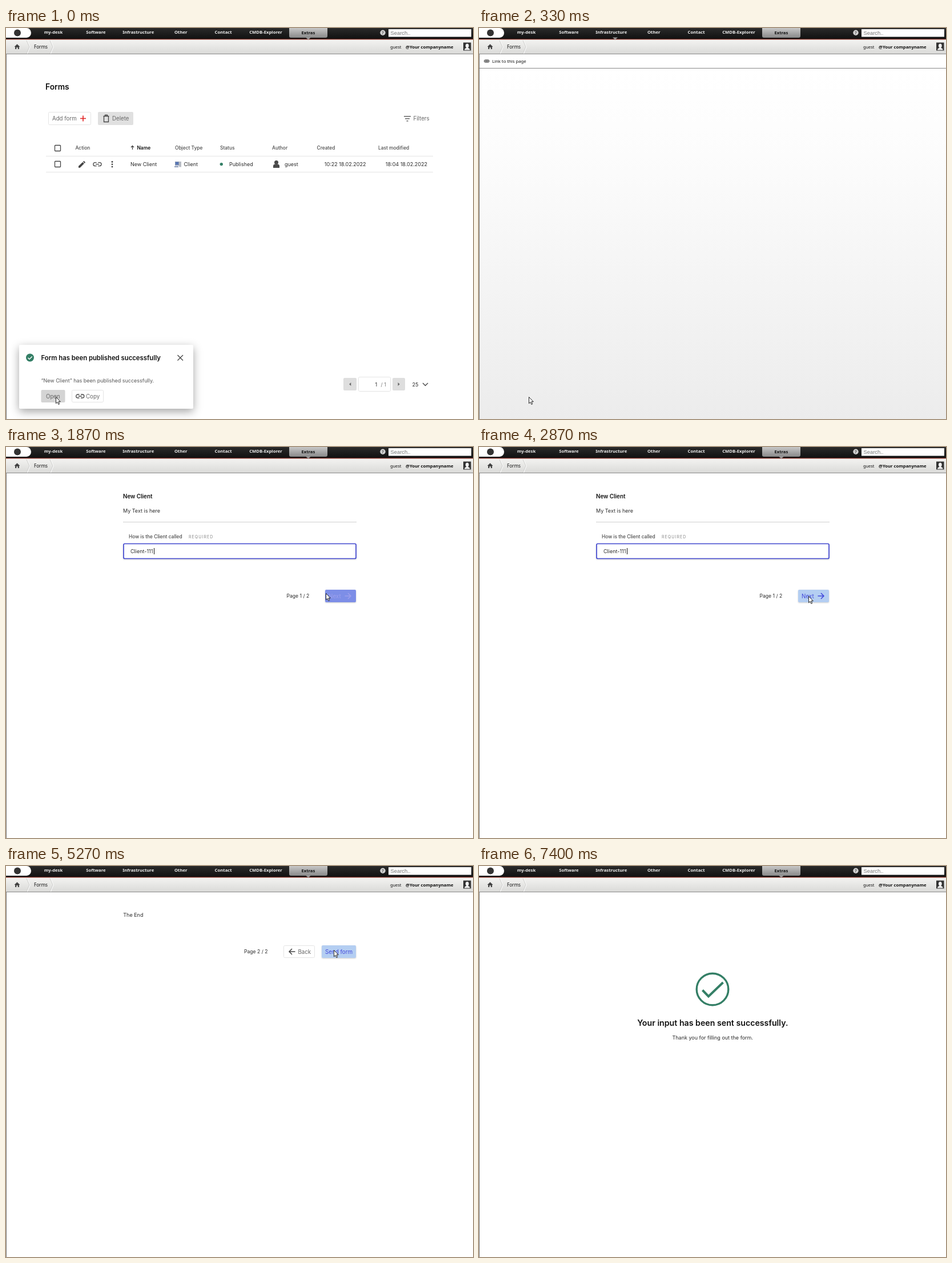
These frames come from a looping animation (818x685 px, 8.14 s). An HTML page:

```html
<!DOCTYPE html>
<html lang="en">
<head>
<meta charset="utf-8">
<title>Filling out a form</title>
<style>
  html, body { margin: 0; width: 100%; height: 100%; overflow: hidden; background: #fff; }
  svg { display: block; width: 818px; height: 685px; font: 9px Inter, sans-serif; fill: #2b2b2b; }
  .ui { font: 7.7px "Noto Sans", sans-serif; fill: #111; }
  .menu { font-weight: 700; fill: #eee; text-anchor: middle; }
  .head { font-size: 8.4px; font-weight: 500; fill: #4a4a4a; }
  .btn { font-size: 9.7px; fill: #666; }
  .bold { font-weight: 600; fill: #111; }
  .mid { text-anchor: middle; }
  .line { fill: none; stroke: #444; stroke-width: 1.3; }
  .frame { fill: #fff; stroke: #e4e4e4; }
  .primary { filter: drop-shadow(0 1px 1px rgba(0, 0, 0, .2)); }
  .toast { fill: #fff; filter: drop-shadow(0 5px 8px rgba(0, 0, 0, .36)); }
</style>
</head>
<body>
<svg viewBox="0 0 818 685">
  <defs>
    <linearGradient id="bar" x2="0" y2="1"><stop stop-color="#2a2a2a"/><stop offset="1" stop-color="#111"/></linearGradient>
    <linearGradient id="crumbs" x2="0" y2="1"><stop stop-color="#f3f3f1"/><stop offset="1" stop-color="#dadad8"/></linearGradient>
    <linearGradient id="tab" x2="0" y2="1"><stop stop-color="#d2d2d2"/><stop offset="1" stop-color="#898989"/></linearGradient>
    <linearGradient id="blank" x2="0" y2="1"><stop stop-color="#fff"/><stop offset=".25" stop-color="#fcfcfc"/><stop offset="1" stop-color="#ececec"/></linearGradient>
    <path id="chain" class="line" d="M6 -3H3.2a3 3 0 0 0 0 6H6M8.5 -3h2.8a3 3 0 0 1 0 6H8.5M4.3 0h6"/>
    <path id="arrow" d="M0 0h10.5M5.5 -5l5 5l-5 5" fill="none" stroke-width="1.5"/>
    <rect id="box" class="line" width="10" height="10" rx="1"/>
  </defs>

  <g id="page">
    <g id="list">
      <text class="bold" x="69" y="107.5" font-size="13.8">Forms</text>
      <rect class="frame" x="74.500" y="147.500" width="74" height="22" rx="2"/>
      <text class="btn" x="81" y="162.300">Add form</text>
      <path d="M130 158.500h10M135 153.500v10" stroke="#e02020" stroke-width="1.6"/>
      <rect x="161" y="147" width="62" height="23" rx="2" fill="#e0e0e0"/>
      <path d="M170.500 154.500h10M173.500 154v-1.500h4v1.500M171.500 154.500v10h8v-10" class="line" stroke="#777"/>
      <text class="btn" x="186" y="162.300" fill="#888">Delete</text>
      <path class="line" d="M697 154.800h12M699 158.800h8M701.500 162.800h3"/>
      <text class="btn" x="713.500" y="162.300">Filters</text>

      <use href="#box" x="85.500" y="205.500"/>
      <g class="head">
        <text x="121.500" y="213">Action</text>
        <path class="line" stroke-width="1" d="M221.500 213v-6.500M219 209l2.500-2.500l2.500 2.500"/>
        <text class="bold" x="229.500" y="213">Name</text>
        <text x="296" y="213">Object Type</text>
        <text x="375" y="213">Status</text>
        <text x="466" y="213">Author</text>
        <text x="544.500" y="213">Created</text>
        <text x="652" y="213">Last modified</text>
      </g>
      <path d="M70 224.500h678M70 252.500h678" stroke="#e4e4e4"/>

      <use href="#box" x="85.500" y="233.500"/>
      <path d="M127 244.800v-2.700l7.200-7.200 2.700 2.700-7.200 7.200zM135 234.200l1.400-1.400 2.700 2.700-1.400 1.400z" fill="#444"/>
      <use href="#chain" x="152.700" y="238.700"/>
      <g fill="#444"><circle cx="186" cy="234.500" r="1.400"/><circle cx="186" cy="238.800" r="1.400"/><circle cx="186" cy="243.100" r="1.400"/></g>
      <text x="218" y="242">New Client</text>
      <path d="M296 234h7v7h-7zM295 242h7v2h-7z" fill="#8796b4"/>
      <path d="M303 234h4v9.500h-4z" fill="#b8bcc4"/><path d="M297 235h5v4h-5z" fill="#5675b5"/>
      <text x="311.500" y="242">Client</text>
      <circle cx="377.300" cy="238.600" r="2.700" fill="#347f66"/>
      <text x="391" y="242">Published</text>
      <circle cx="473.500" cy="235.500" r="3.500" fill="#4a4a4a"/>
      <path d="M468 245v-3q0-3.500 3.500-3.500h4q3.500 0 3.500 3.500v3z" fill="#4a4a4a"/>
      <text x="488" y="242">guest</text>
      <text x="630.500" y="242" text-anchor="end">10:22 18.02.2022</text>
      <text x="738" y="242" text-anchor="end">18:04 18.02.2022</text>

      <path d="M591 615q0-2 2-2h19q2 0 2 2v18q0 2-2 2h-19q-2 0-2-2zM677 615q0-2 2-2h18q2 0 2 2v18q0 2-2 2h-18q-2 0-2-2z" fill="#dedede"/>
      <path d="M604.300 621v6l-3.200-3zM686.500 621v6l3.200-3z" fill="#666"/>
      <rect class="frame" x="617.500" y="611.500" width="56" height="25" rx="2"/>
      <text x="646.500" y="627.500">1<tspan fill="#777" x="656.500">/ 1</tspan></text>
      <text x="711.500" y="627.500">25</text>
      <path class="line" d="M730 622l4.500 4.500l4.500-4.500"/>

      <rect class="toast" x="23" y="555" width="305" height="112" rx="2"/>
      <circle cx="42" cy="577.500" r="7" fill="#347f66"/>
      <path d="M38.500 577.700l2.500 2.500l4.700-4.800" fill="none" stroke="#fff" stroke-width="1.500"/>
      <text class="bold" x="61.500" y="581.700" font-size="11.300">Form has been published successfully</text>
      <path class="line" d="M300.500 573l9.500 9.500M310 573l-9.500 9.500"/>
      <text x="61.500" y="620.500" fill="#555">“New Client” has been published successfully.</text>
      <rect x="61.500" y="634" width="42" height="22" rx="2" fill="#d4d4d4"/>
      <text class="btn" x="70" y="648.800">Open</text>
      <rect class="frame" x="115.500" y="634.500" width="55" height="21" rx="2"/>
      <use href="#chain" x="122.500" y="645"/>
      <text class="btn" x="140" y="648.800">Copy</text>
    </g>

    <g id="loading">
      <rect y="71" width="818" height="614" fill="url(#blank)"/>
      <path d="M0 70.500h818" stroke="#888"/>
      <rect x="9" y="55.800" width="9" height="4.400" rx="2.200" fill="#aaa" stroke="#555"/>
      <path d="M11 58h5" stroke="#444"/>
      <text class="ui" x="23" y="60.500" font-size="7.500">Link to this page</text>
    </g>

    <g id="form">
      <text class="bold" x="205" y="90" font-size="9.800">New Client</text>
      <text x="205" y="115">My Text is here</text>
      <path d="M205 131.500h409" stroke="#cfcfcf"/>
      <text class="head" x="215" y="160">How is the Client called</text>
      <text x="320" y="160" font-size="7" letter-spacing="1.050" fill="#888">REQUIRED</text>
      <rect class="primary" x="206" y="169.500" width="407" height="26" rx="2" fill="#fff" stroke="#4147d0" stroke-width="1.700"/>
      <text x="218" y="186">Client-111</text>
      <path id="caret" d="M259.500 177v11" stroke="#111"/>
      <text x="491.500" y="264" font-size="8.600">Page 1 / 2</text>
      <rect id="nextBox" class="primary" x="559" y="250" width="54" height="22" rx="2"/>
      <g id="nextLabel"><text x="565" y="264.800" font-size="9.800" fill="inherit">Next</text><use href="#arrow" x="593.500" y="261"/></g>
    </g>

    <g id="end">
      <text x="205.300" y="89">The End</text>
      <text x="417" y="153" font-size="8.600">Page 2 / 2</text>
      <rect class="frame" x="486.500" y="139.500" width="54" height="21" rx="2"/>
      <use href="#arrow" transform="translate(506.500 150) scale(-1 1)" stroke="#444"/>
      <text class="btn" x="511.500" y="153.700">Back</text>
      <rect id="sendBox" class="primary" x="553" y="139" width="60" height="22" rx="2"/>
      <text id="sendLabel" class="mid" x="583" y="153.700" font-size="9.800">Send form</text>
    </g>

    <g id="success">
      <g fill="none" stroke="#347f66"><circle cx="409" cy="216" r="27.800" stroke-width="3.400"/><path d="M391.500 217.500l10.500 11l25.500-24.500" stroke-width="4"/></g>
      <text class="bold mid" x="409.300" y="280" font-size="14.200">Your input has been sent successfully.</text>
      <text class="mid" x="409.300" y="304">Thank you for filling out the form.</text>
    </g>

    <path d="M.5 45v640" stroke="#777"/>
    <rect width="818" height="19" fill="url(#bar)"/>
    <path d="M0 19.500h818" stroke="#7d3028"/>
    <path d="M0 20.500h818" stroke="#c9aaa4"/>
    <rect y="21" width="818" height="24" fill="url(#crumbs)"/>
    <path d="M0 45.500h818" stroke="#888"/>
    <path d="M0 0h36a8 8.500 0 0 1 0 17H0z" fill="#fff"/>
    <circle cx="20" cy="8.500" r="6" fill="#333"/>
    <rect x="496" y="-3" width="67" height="20" rx="3" fill="url(#tab)"/>
    <path id="pointer" d="M-4.500 16.500h9l-4.500 4z" fill="#999"/>
    <g class="ui menu" id="menu"></g>
    <circle cx="660" cy="8.200" r="4.700" fill="#d0d0d0"/>
    <text class="ui mid" x="660" y="11" font-weight="700">?</text>
    <rect x="670" y="2" width="145" height="13.500" fill="#fff"/>
    <text x="673.500" y="12" style="font:9.400px 'Liberation Sans',sans-serif" fill="#757575">Search..</text>
    <path d="M14.500 33l5-4.800l5 4.800h-1.500v4h-2.300v-3h-2.400v3h-2.300v-4z" fill="#444"/>
    <path d="M37 22l5 11l-5 12M78 22l5 11l-5 12" fill="none" stroke="#fafafa" stroke-width="1.500"/>
    <path d="M36 22l5 11l-5 12M77 22l5 11l-5 12" fill="none" stroke="#cdcdcb"/>
    <g class="ui">
      <text x="49" y="36" style="font-size:8.100px">Forms</text>
      <text x="673" y="35.500" style="font-size:7.400px">guest</text>
      <text x="700" y="35.500" font-weight="700">@Your companyname</text>
    </g>
    <rect x="801" y="25.500" width="13.500" height="14" fill="#333"/>
    <ellipse cx="807.800" cy="31" rx="2.900" ry="3.600" fill="#f2f2f2"/>
    <path d="M803 38.500q0-3 3.300-3.500v-2h3v2q3.300.5 3.300 3.500z" fill="#f2f2f2"/>
  </g>
  <path id="cursor" d="M.5 .5v11.300l2.600-2.400l1.800 4.100l1.800-.8l-1.800-4h3.400z" fill="#fff" stroke="#111" stroke-width=".9"/>
</svg>
<script>
const LOOP = 8140, STEP = 200 / 3;
const el = id => document.getElementById(id);

const labels = ["my-desk", "Software", "Infrastructure", "Other", "Contact", "CMDB-Explorer", "Extras"];
el("menu").innerHTML = labels.map((label, i) =>
  `<text x="${83 + 74.4 * i}" y="${i < 6 ? 10.3 : 11}"${i < 6 ? "" : ' fill="#111" style="fill:#111"'}>${label}</text>`).join("");

// Start time of each scene
const scenes = [["list", 0], ["white", 130], ["loading", 330], ["form", 470], ["end", 3270], ["success", 5330]];

// Pointer positions: time, x, y
const path = [
  [530, 87, 646], [730, 128, 570], [1000, 252, 369], [1270, 405, 258], [1600, 525, 246], [2000, 577, 261],
  [3940, 577, 261], [4330, 500, 190], [4530, 427, 140], [4670, 490, 125], [4800, 553, 131], [5130, 574, 147],
  [5330, 574, 147], [5540, 600, 205], [5800, 639, 277], [6670, 639, 277], [7330, 3, 672], [7400, 3, 700]
];

const progress = (t, from, to) => Math.min(1, Math.max(0, (t - from) / (to - from)));
const mix = (a, b, p) => a + (b - a) * p;
const blend = (a, b, p) => `rgb(${a.map((v, i) => Math.round(mix(v, b[i], p)))})`;
const INDIGO = [66, 72, 218], SKY = [180, 206, 242], WHITE = [255, 255, 255];

function pointerAt(t) {
  const i = path.findIndex(point => point[0] > t);
  if (i === 0) return path[0].slice(1);
  if (i < 0) return path[path.length - 1].slice(1);
  const [a, b] = [path[i - 1], path[i]], p = progress(t, a[0], b[0]);
  return [mix(a[1], b[1], p), mix(a[2], b[2], p)];
}

function hover(name, p) {
  const ink = blend(WHITE, INDIGO, p);
  el(name + "Box").style.fill = blend(INDIGO, SKY, p);
  el(name + "Label").style.fill = ink;
  el(name + "Label").style.stroke = "none";
  el(name + "Label").querySelector("use")?.style.setProperty("stroke", ink);
}

function draw(now) {
  const t = Math.floor((now % LOOP + 4) / STEP) * STEP + 4;
  const current = scenes.filter(scene => scene[1] <= t).pop()[0];
  for (const [name] of scenes) if (name !== "white") el(name).style.display = name === current ? "" : "none";
  el("page").style.display = current === "white" ? "none" : "";
  el("pointer").setAttribute("transform", `translate(${current === "loading" ? 238.5 : 529.5} 0)`);
  el("caret").style.display = Math.floor((t - 2730) / 467) % 2 ? "none" : "";
  hover("next", progress(t, 1730, 2000));
  hover("send", progress(t, 4800, 5130));
  el("cursor").setAttribute("transform", `translate(${pointerAt(t).map(Math.round)})`);
}

const start = performance.now();
function tick() {
  draw(performance.now() - start);
  requestAnimationFrame(tick);
}
tick();
</script>
</body>
</html>
```
